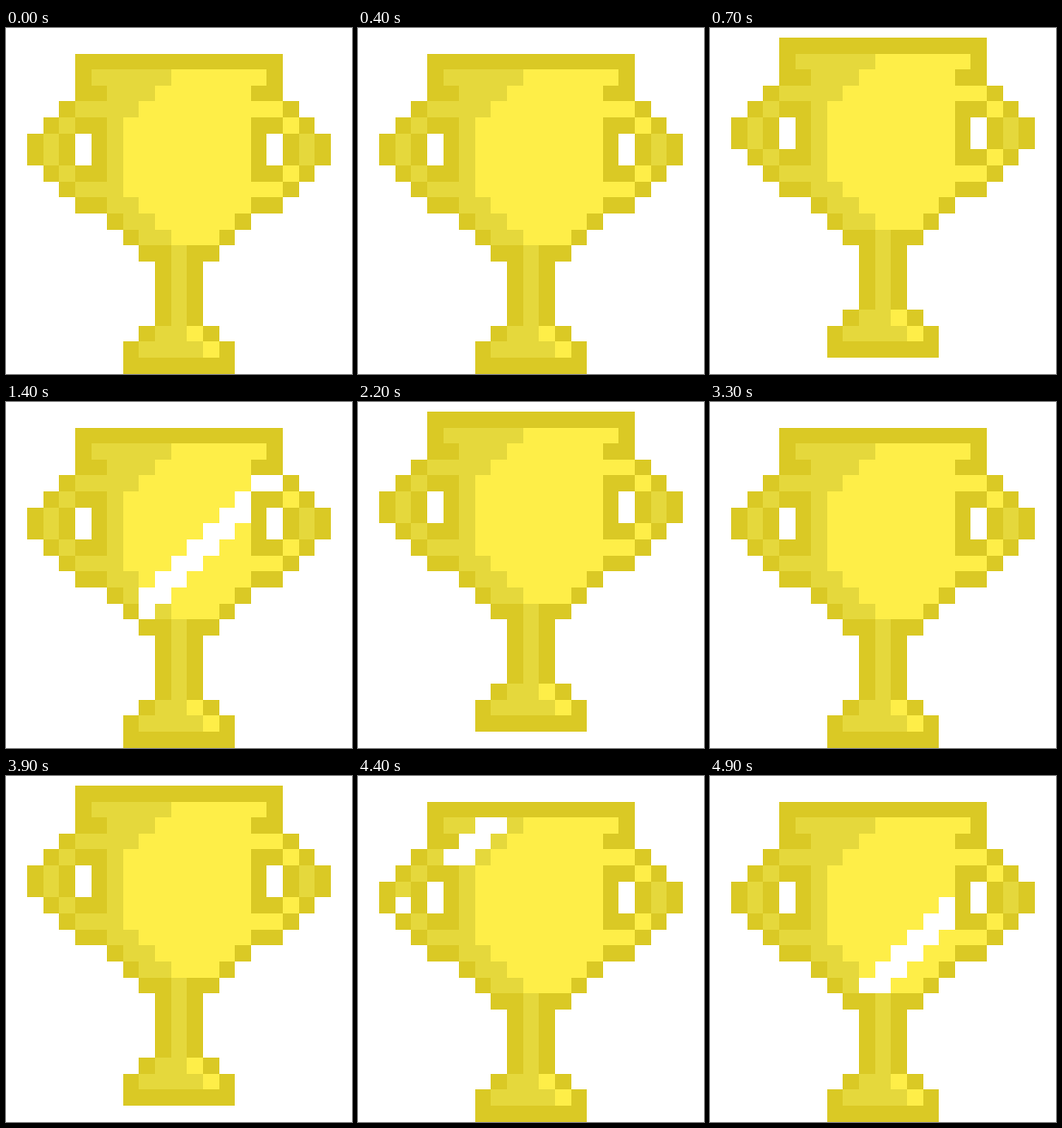
These frames come from a looping animation (360 by 360 pixels, 5000 ms). An HTML page with a canvas:

```html
<!DOCTYPE html>
<html lang="en">
<head>
<meta charset="utf-8">
<title>Pixel trophy</title>
<style>
  html, body { margin: 0; width: 100%; height: 100%; overflow: hidden; background: #fff; }
  canvas { display: block; width: 360px; height: 360px; }
</style>
</head>
<body>
<canvas id="stage" width="360" height="360"></canvas>
<script>
const ctx = document.getElementById('stage').getContext('2d');

// o = outline, s = shade, y = bright
const ROWS = [
  '   ooooooooooooo   ',
  '   osssssyyyyyyo   ',
  '   oosssyyyyyyoo   ',
  '  ossssyyyyyyyyyo  ',
  ' osoosyyyyyyyyooyo ',
  'oso osyyyyyyyyo oso',
  'oso osyyyyyyyyo oso',
  ' osoosyyyyyyyyooyo ',
  '  osssyyyyyyyyyyo  ',
  '   oossyyyyyyyoo   ',
  '     ossyyyyyo     ',
  '      ossyyyo      ',
  '       oosoo       ',
  '        oso        ',
  '        oso        ',
  '        oso        ',
  '        oso        ',
  '       ossyo       ',
  '      ossssyo      ',
  '      ooooooo      '
];
const COLORS = { o: '#dac925', s: '#e5d83c', y: '#feee48' };

const LOOP = 5000, STEP = 100, CYCLE = 17;
const LIFT = [0, 1, 2, 1, 0, 1, 2, 1];      // two hops, in cells
const SHINE_START = 9;
const SHINE = [5, 7, 9, 12, 14, 17, 19];    // diagonal (column + row) of the band

const px = c => Math.round(22 + c * 16.63);
const py = r => Math.round(26.5 + r * 16.66);

function draw(phase) {
  const lift = LIFT[phase] || 0;
  const band = SHINE[phase - SHINE_START];
  ctx.fillStyle = '#fff';
  ctx.fillRect(0, 0, 360, 360);
  ROWS.forEach((row, r) => {
    [...row].forEach((kind, c) => {
      if (kind === ' ') return;
      const d = c + r - band;
      const lit = kind !== 'o' && c < 16 && (d === 0 || d === 1);
      ctx.fillStyle = lit ? '#fff' : COLORS[kind];
      const x = px(c), y = py(r - lift);
      ctx.fillRect(x, y, px(c + 1) - x, py(r - lift + 1) - y);
    });
  });
}

const start = performance.now();
function tick() {
  const t = (performance.now() - start) % LOOP;
  draw(Math.floor(t / STEP) % CYCLE);
  requestAnimationFrame(tick);
}
tick();
</script>
</body>
</html>
```
